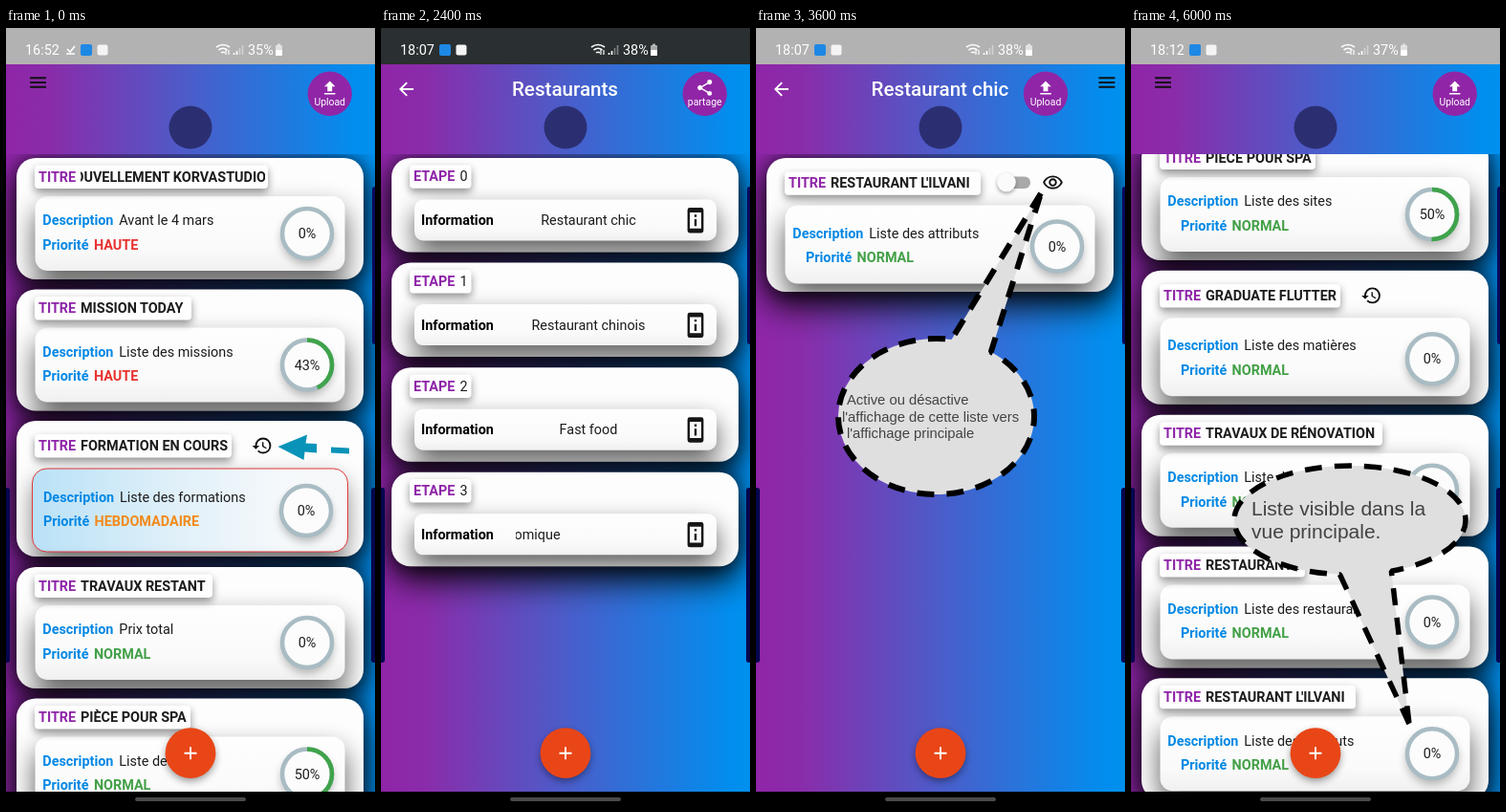
An HTML page for the animation above (7.2 s loop, 386 by 814 pixels).

```html
<!DOCTYPE html>
<html lang="fr">
<head>
<meta charset="utf-8">
<title>Listes</title>
<style>
  html, body { margin: 0; width: 100%; height: 100%; overflow: hidden; background: #000; }
  svg { display: block; width: 100vw; height: 100vh; font: 14.4px Roboto, sans-serif; }
  text { white-space: pre; }
  .b { font-weight: 700; }
  .note { font-family: "Liberation Sans", Arial, sans-serif; }
</style>
</head>
<body>
<svg id="stage" viewBox="0 0 386 814" preserveAspectRatio="none"></svg>
<script>
const HOLD = 1200;
const PURPLE = '#8e24a8', BLUE = '#0288e4', GREEN = '#43a047', INK = '#1c1c1c';
const LEVELS = { HAUTE: '#e8322f', HEBDOMADAIRE: '#f28a1c', NORMAL: GREEN };
const ICONS = {
  menu: 'M3 18h18v-2H3zm0-5h18v-2H3zm0-7v2h18V6z',
  back: 'M20 11H7.83l5.59-5.59L12 4l-8 8 8 8 1.41-1.41L7.83 13H20z',
  upload: 'M5 20h14v-2H5zm0-10h4v6h6v-6h4l-7-7z',
  share: 'M18 16.08c-.76 0-1.44.3-1.96.77L8.91 12.7c.05-.23.09-.46.09-.7s-.04-.47-.09-.7l7.05-4.11A2.99 2.99 0 0 0 21 5a3 3 0 1 0-6 0c0 .24.04.47.09.7L8.04 9.81a3 3 0 1 0 0 4.38l7.12 4.16c-.05.21-.08.43-.08.65a2.92 2.92 0 1 0 2.92-2.92z',
  history: 'M13 3a9 9 0 0 0-9 9H1l3.89 3.89.07.14L9 12H6a7 7 0 1 1 7 7c-1.93 0-3.68-.79-4.94-2.06l-1.42 1.42A8.95 8.95 0 0 0 13 21a9 9 0 0 0 0-18zm-1 5v5l4.28 2.54.72-1.21-3.5-2.08V8z',
  eye: 'M12 6a9.77 9.77 0 0 1 8.82 5.5 9.76 9.76 0 0 1-17.64 0A9.77 9.77 0 0 1 12 6m0-2C7 4 2.73 7.11 1 11.5 2.73 15.89 7 19 12 19s9.27-3.11 11-7.5C21.27 7.11 17 4 12 4zm0 5a2.5 2.5 0 0 1 0 5 2.5 2.5 0 0 1 0-5m0-2a4.5 4.5 0 1 0 0 9 4.5 4.5 0 0 0 0-9z',
  device: 'M13 7h-2v2h2zm0 4h-2v6h2zM17 1H7a2 2 0 0 0-2 2v18a2 2 0 0 0 2 2h10a2 2 0 0 0 2-2V3a2 2 0 0 0-2-2zM17 19H7V5h10z'
};

let clips = 0;

const rect = (x, y, w, h, r, fill, more = '') =>
  `<rect x="${x}" y="${y}" width="${w}" height="${h}" rx="${r}" fill="${fill}" ${more}/>`;
const circle = (x, y, r, fill, more = '') =>
  `<circle cx="${x}" cy="${y}" r="${r}" fill="${fill}" ${more}/>`;
const path = (d, fill, more = '') => `<path d="${d}" fill="${fill}" ${more}/>`;
const text = (x, y, s, fill = INK, more = '') =>
  `<text x="${x}" y="${y}" fill="${fill}" ${more}>${s}</text>`;
const bold = (x, y, s, fill) => text(x, y, s, fill, 'class="b"');
const mid = (x, y, s, fill, more = '') => text(x, y, s, fill, 'text-anchor="middle" ' + more);
const blur = (sd, op) => `style="filter:blur(${sd}px)" opacity="${op}"`;
const icon = (name, x, y, k = .94, fill = '#111') =>
  path(ICONS[name], fill, `fill-rule="evenodd" transform="translate(${x} ${y}) scale(${k}) translate(-12 -12)"`);

function clip(x, y, w, h, r, body) {
  const id = 'c' + clips++;
  return `<clipPath id="${id}">${rect(x, y, w, h, r, '#000')}</clipPath><g clip-path="url(#${id})">${body}</g>`;
}

function raised(x, y, w, h, r, fill, dy, sd, op) {
  return rect(x, y + dy, w, h, r, '#000', blur(sd, op)) + rect(x, y, w, h, r, fill);
}

function shell(y, h, body) {
  return rect(11, y, 363, h, 20, '#000', blur(9, .55)) +
    raised(11, y, 363, h, 20, '#fdfdfd', 15, 17, .92) + clip(11, y, 363, h, 20, body);
}

const chip = (y, end) => raised(30, y - 12, end - 30, 24.5, 4, '#fefefe', 4, 4, .42);

function ring(x, y, pct) {
  const len = 2 * Math.PI * 26;
  const band = (color, more) =>
    circle(x, y, 26, 'none', `stroke="${color}" stroke-width="4.6" ${more}`);
  return circle(x, y + 5, 27, '#000', blur(5, .28)) + circle(x, y, 26, '#fcfcfc') +
    band('#a9bcc3', '') +
    (pct ? band('#3fa34b', `stroke-dasharray="${len * pct / 100} ${len}" transform="rotate(-90 ${x} ${y})"`) : '') +
    mid(x, y + 5, pct + '%');
}

// kind: plain, tall (room for an icon) or boxed (tall with a red frame)
const KINDS = {
  plain: { h: 127, title: 19.5, top: 40, bottom: 118, desc: 65.3, ring: 79 },
  tall: { h: 140, title: 26.2, top: 49.5, bottom: 131.5, desc: 78.5, ring: 92.5 },
  boxed: { h: 142, title: 26, top: 50, bottom: 137, desc: 79.5, ring: 94 }
};

function listCard(y, title, end, desc, level, o = {}) {
  const k = KINDS[o.kind || 'plain'], boxed = o.kind === 'boxed';
  const ty = y + k.title, dy = y + k.desc + 5, x = boxed ? 39 : 38.3, px = o.px || x;
  const h = k.bottom - k.top;
  let s = boxed
    ? raised(30, y + k.top + 2, 324, h - 3, 14, '#f9fbfc', 11, 13, .6) +
      rect(27.5, y + k.top, 330, h, 15, o.tint || 'url(#pale)', 'stroke="#e5383b" stroke-width="1"')
    : raised(30.5, y + k.top, 324, h, 13, 'url(#paper)', 14, 14, .64);
  s += chip(ty, end) + bold(34, ty + 5, 'TITRE', PURPLE);
  s += o.slide ? clip(78, ty - 12, 193, 24, 0, bold(o.slide, ty + 5, title)) : bold(78, ty + 5, title);
  s += bold(x, dy, 'Description', BLUE);
  s += clip(112, dy - 16, 124 + (boxed ? 20 : 4), 22, 0, text(x + 80, dy, desc));
  s += bold(px, dy + 25.6, 'Priorité', BLUE) + bold(px + 53.6, dy + 25.6, level, LEVELS[level]);
  s += ring(boxed ? 314 : 315, y + k.ring, o.pct || 0);
  if (o.clock) s += icon('history', o.clock, ty);
  return shell(y, k.h, s + (o.extra || ''));
}

function stepCard(n, info, x) {
  const y = 136 + n * 109.6, ty = y + 19.3, by = y + 70;
  return shell(y, 98.5,
    raised(35, y + 43.5, 316, 43, 9, 'url(#paper)', 12, 13, .64) +
    chip(ty, 94.5) + bold(34, ty + 5, 'ETAPE', PURPLE) + text(82.5, ty + 5, n) +
    bold(42, by, 'Information', '#000') +
    (x ? clip(141, by - 16, 152, 22, 0, text(x, by, info)) : mid(217, by, info)) +
    icon('device', 329, y + 65.3, 1.2, '#161616'));
}

function status(time, charge, dark, check) {
  const x = check ? 78 : 61;
  return rect(0, 0, 386, 38, 0, dark ? '#2a2f31' : '#b2b2b2') +
    text(20, 28, time, '#fff') +
    (check ? path('M63 27h9M64 22l3 3 5-6', 'none', 'stroke="#fff" stroke-width="1.6"') : '') +
    rect(x, 17, 12, 12, 2, '#1e88e5') + rect(x + 17.5, 17.5, 11, 11, 2, '#f4f4f4') +
    path('M220 20q7-5 14 0M222.5 23q4.5-3.4 9 0M225 26q2-1.6 4 0', 'none', 'stroke="#fff" stroke-width="1.6"') +
    path('M230 28v-5m3 0v5', 'none', 'stroke="#fff" stroke-width="1.2"') +
    path('M238.5 28v-2m3 2v-4', 'none', 'stroke="#fff" stroke-width="1.6"') +
    path('M244.5 28v-7m3 7v-10', 'none', 'stroke="#fff" stroke-opacity=".4" stroke-width="1.6"') +
    text(253, 28, charge + '%', '#fff') +
    rect(282, 18, 7, 11, 1, '#fff', 'fill-opacity=".6"') + rect(284, 16.5, 3, 2, 0, '#fff', 'fill-opacity=".6"') +
    rect(282, 23, 7, 6, 1, '#fff');
}

function roundButton(x, name, label) {
  return circle(x, 68.8, 23.2, '#9026a7') +
    icon(name, x, name === 'share' ? 62.5 : 63, name === 'share' ? .84 : .82, '#fff') +
    mid(x, 81, label, '#fff', 'font-size="10.4"');
}

function header(title) {
  return rect(0, 38, 386, 94, 0, 'url(#sky)') + circle(193, 104, 22.5, '#2b2f72') +
    (title ? icon('back', 26.5, 64, .94, '#fff') +
      mid(192.5, 71, title, '#fff', 'font-size="20.6" font-weight="500"') : icon('menu', 33.5, 57));
}

const homeBar = () => header() + roundButton(338.7, 'upload', 'Upload');
const listBar = () => header('Restaurant chic') + roundButton(303, 'upload', 'Upload') + icon('menu', 367, 57);

const chrome = () =>
  rect(-4, 481, 8, 183, 3, '#05064e') + rect(382, 481, 8, 183, 3, '#05064e') +
  rect(383, 166, 8, 165, 3, '#0a0a5c') +
  circle(193, 762, 25.5, '#000', blur(4, .45)) + circle(193, 758.7, 26.4, '#e94617') +
  path('M186.5 758.7h13m-6.5-6.5v13', 'none', 'stroke="#fff" stroke-width="1.9"') +
  rect(0, 799, 386, 15, 0, '#000') + rect(135, 805, 116, 4, 2, '#4a4a4a');

// Ellipse whose outline opens between angles a and b (degrees) into a pointed tail.
function bubble(cx, cy, rx, ry, a, b, tip, dash, width, size, lines) {
  const at = deg => {
    const t = deg * Math.PI / 180;
    return `${cx + rx * Math.cos(t)} ${cy + ry * Math.sin(t)}`;
  };
  const d = `M${tip}L${at(a)}A${rx} ${ry} 0 1 ${a > b ? 1 : 0} ${at(b)}Z`;
  return path(d, '#dfdfdf', `stroke="#000" stroke-width="${width}" stroke-dasharray="${dash}" stroke-linejoin="bevel"`) +
    lines.map(([x, y, s]) => text(x, y, s, '#434343', `class="note" font-size="${size}"`)).join('');
}

const arrow = () => path('M284.5 438L315 425.5 313.5 434.5 325 435v9.5L312.5 443.5 311.5 452ZM340 438.5l19 1v6l-19-1z', '#0a93b8');

function toggle(on) {
  const x = on ? 280 : 262;
  return rect(on ? 256 : 258, 155.5, 29, 12.5, 6, on ? '#fde047' : '#a9a9a9') +
    circle(x, 163.5, 9.5, '#000', blur(2, .4)) + circle(x, 161.5, 9.8, on ? '#ff9d45' : '#fbfbfb');
}

const venue = on => listCard(136, "RESTAURANT L'ILVANI", 235, 'Liste des attributs', 'NORMAL',
  { kind: 'tall', px: 52, extra: toggle(on) + icon('eye', 310.5, 162) });

const courses = tint => listCard(411, 'FORMATION EN COURS', 236, 'Liste des formations', 'HEBDOMADAIRE',
  { kind: 'boxed', clock: 268, tint });

const scenes = [
  () => listCard(136, 'OUVELLEMENT KORVASTUDIO', 274, 'Avant le 4 mars', 'HAUTE', { slide: 71.5 }) +
    listCard(273.5, 'MISSION TODAY', 194, 'Liste des missions', 'HAUTE', { pct: 43 }) +
    courses('url(#ice)') +
    listCard(564, 'TRAVAUX RESTANT', 216, 'Prix total', 'NORMAL') +
    listCard(701.5, 'PIÈCE POUR SPA', 193, 'Liste des sites', 'NORMAL', { pct: 50 }) +
    homeBar() + status('16:52', 35, false, true) + chrome() + arrow(),

  () => listCard(136, 'ÉCHÉANCE IMPORTANTE', 252, 'Liste des échéances', 'HAUTE', { px: 52 }) +
    listCard(273.5, 'MISSION TODAY', 190, 'Liste des taches', 'HAUTE', { px: 52, pct: 67 }) +
    courses() +
    listCard(564, 'PROJETS EN COURS', 217, 'Liste des projets', 'HEBDOMADAIRE', { kind: 'boxed', clock: 250 }) +
    listCard(717, 'TRAVAUX RESTANT', 216, 'Prix total', 'NORMAL', { px: 52 }) +
    homeBar() + status('18:05', 39) + chrome() +
    bubble(135, 80.5, 68, 42.5, 16, 41, '272 124', '14.5 9.5', 5.5, 14.8, [[73, 86, 'Page principale.']]),

  () => stepCard(0, 'Restaurant chic') + stepCard(1, 'Restaurant chinois') + stepCard(2, 'Fast food') +
    stepCard(3, 'omique', 139.5) +
    header('Restaurants') + roundButton(338.7, 'share', 'partage') + status('18:07', 38, true) + chrome(),

  () => venue(false) + listBar() + status('18:07', 38) + chrome() +
    bubble(188.5, 406.5, 102.5, 81.5, -81, -56, '298 173', '18 13', 6, 14.8, [
      [95, 394, 'Active ou désactive'],
      [90, 411.5, "l'affichage de cette liste vers"],
      [95, 429, "l'affichage principale"]]),

  () => venue(true) + listBar() + status('18:08', 38) + chrome() +
    bubble(193, 406, 108, 81.5, -87, -62, '275 176', '18 13', 6, 17.4, [
      [93, 401.5, 'Liste activée dans la vue'], [93, 422, 'principale.']]),

  () => listCard(116, 'PIÈCE POUR SPA', 193, 'Liste des sites', 'NORMAL', { px: 52, pct: 50 }) +
    listCard(253.7, 'GRADUATE FLUTTER', 219, 'Liste des matières', 'NORMAL', { kind: 'tall', px: 52, clock: 251.5 }) +
    listCard(404.7, 'TRAVAUX DE RÉNOVATION', 263, 'Liste des travaux', 'NORMAL', { px: 52 }) +
    listCard(542.5, 'RESTAURANTS', 182, 'Liste des restaurants', 'NORMAL', { px: 52 }) +
    listCard(680.3, "RESTAURANT L'ILVANI", 235, 'Liste des attributs', 'NORMAL', { px: 52 }) +
    homeBar() + status('18:12', 37) + chrome() +
    bubble(229, 515, 121, 57, 95, 69, '291 728', '18 13', 5.5, 21, [
      [126, 510, 'Liste visible dans la'], [126, 534, 'vue principale.']])
];

const grad = (id, dir, ...stops) => `<linearGradient id="${id}" ${dir}>` +
  stops.map(([at, c]) => `<stop offset="${at}" stop-color="${c}"/>`).join('') + '</linearGradient>';
const DOWN = 'x2="0" y2="1"';

const stage = document.getElementById('stage');
stage.innerHTML = '<defs>' +
  grad('sky', 'gradientUnits="userSpaceOnUse" x1="0" x2="386"',
    [0, '#8f25a8'], [.12, '#8a2caa'], [.5, '#4b5dca'], [.95, '#018eee'], [1, '#0190ee']) +
  grad('paper', DOWN, [0, '#fefefe'], [.7, '#fafafa'], [1, '#f0f0f0']) +
  grad('pale', DOWN, [0, '#f3f8fb'], [.7, '#f5f8fa'], [1, '#dfe3e6']) +
  grad('ice', '', [0, '#b9e1f7'], [.45, '#e0f0f9'], [.8, '#f6f9fb'], [1, '#f6f8f9']) +
  '</defs>' + scenes.map(s => `<g display="none">${rect(0, 38, 386, 761, 0, 'url(#sky)')}${s()}</g>`).join('');

const views = [...stage.children].slice(1);
let shown = -1;

function draw(now) {
  const i = Math.floor(now / HOLD) % views.length;
  if (i !== shown) {
    views.forEach((v, n) => v.setAttribute('display', n === i ? 'inline' : 'none'));
    shown = i;
  }
}

const start = performance.now();
function tick() {
  draw(performance.now() - start);
  requestAnimationFrame(tick);
}
tick();
</script>
</body>
</html>
```
